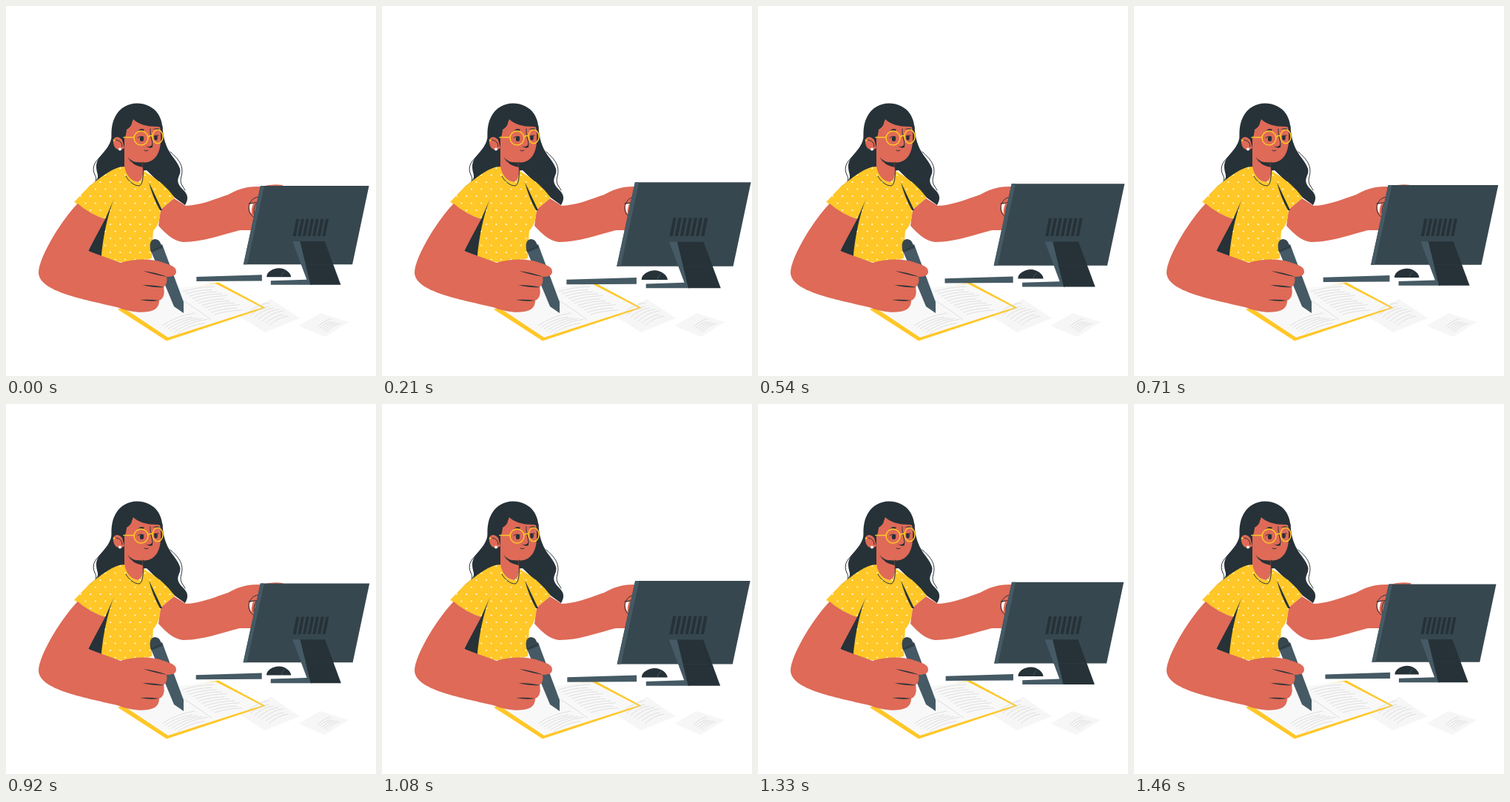
Recreate the animation shown at these times as an HTML page. Size 500 by 500 pixels, loop 1.5 s.

```html
<!DOCTYPE html>
<html lang="en">
<head>
<meta charset="utf-8">
<title>Desk work</title>
<style>
  html, body { margin: 0; width: 100%; height: 100%; overflow: hidden; background: #fff; }
  svg { display: block; width: 100%; height: 100%; }
  .skin { fill: #de6a57; }
  .dark { fill: #263238; }
  .steel { fill: #37474f; }
  .slate { fill: #455a64; }
  .yellow { fill: #ffc727; }
  .paper { fill: #f6f6f6; }
  .ink, .gold, .rule { fill: none; stroke-linecap: round; }
  .ink { stroke: #263238; stroke-width: 1; }
  .gold { stroke: #ffc727; stroke-width: 1.5; }
  .rule { stroke: #d8d8d8; stroke-width: .8; }
</style>
</head>
<body>
<svg viewBox="0 0 500 500">
  <defs>
    <pattern id="dots" width="13.4" height="19" patternUnits="userSpaceOnUse" patternTransform="translate(151.4 235)">
      <g fill="#fff"><circle cx="3" cy="3" r="1"/><circle cx="9.7" cy="12.5" r="1"/></g>
    </pattern>
    <path id="shirt" d="M160 217C146 217 130 230 112 244L92 265Q110 280 134 288L148 256C138 278 131 312 129 338Q152 348 170 347L197 341C198 328 198 314 199 304C206 296 208 288 209 275L228 259Q213 238 186 223Q184 239 176 238Q163 233 160 217Z"/>
  </defs>

  <!-- loose sheets and notebook -->
  <path class="paper" d="M313 418L358 396L397 422L350 441ZM395 432L425 415L463 427L431 447Z"/>
  <path class="yellow" d="M151 410L217 452.5L351 408L287 373.5L235 383Z"/>
  <path fill="#f8f8f8" d="M159 408L219 448L346 407.5L283 375L235 381L207 388Z"/>
  <path class="rule" d="M236 396Q262 412 277 424"/>
  <g id="rules"></g>

  <!-- hair behind -->
  <path class="dark" d="M143 170C144 195 122 200 122 217C122 230 131 231 112 244L160 225L190 222L228 259L242 269C247 260 246 255 239 248C225 234 238 230 235 220C231 205 213 199 211.500 162L175 140Z"/>
  <path class="ink" d="M142 187C132 204 112 210 120 228C125 237 118 241 111 246M222 197C236 209 240 218 237 230C234 240 239 243 242 249"/>

  <!-- far arm -->
  <path class="skin" d="M209 275L227 260L243 270C264 269 282 261 300 255C318 245 328 244 345 244Q360 240 374 242L374 303L316 303C292 309 266 319 240 319C225 318 214 305 206 297Z"/>
  <path d="M329 268L334 267Q331 275 332 281Q328 276 329 268Z" fill="#fff"/>
  <path class="ink" d="M341 258C325 260 324 283 337 286M328 267L342 265M338 267Q333 275 336 284"/>

  <!-- head -->
  <path class="skin" d="M160 190V222Q165 236 178 238Q185 236 186 222L184 206Z"/>
  <path class="dark" d="M164 204Q172 213 184 211L185 218Q171 216 164 204Z"/>
  <path class="skin" d="M160 160L172 149L205 158Q210 163 209 181C209 196 203 211 187 211.500C173 211.500 163 205 160 194Z"/>
  <path class="dark" d="M143 180C140 154 152 132 177 131.500C199 132 211 147 211.500 166Q209 163 204 163Q182 163 172 153C169 160 170 163 163 167C162 177 160 182 156 181L148 186Z"/>
  <path class="skin" d="M157 181C151 174 144 177 145 185Q146 194 155 195L160 192Z"/>
  <path class="ink" d="M149 181Q157 182 157 190M195 166C194 174 198 181 198 188M187 195Q190 197 192 195"/>
  <path class="dark" d="M189 189Q194 192 198 187V191Q193 193 189 189Z"/>
  <circle cx="154" cy="193.500" r="1.900" fill="#fff"/>
  <circle class="yellow" cx="146" cy="181.500" r="1.300"/>
  <path class="dark" d="M178 169Q182 164 187 167L185 169Q181 167 178 169ZM198 167Q203 164 207 166L207 167.500Q202 166 198 167Z"/>
  <g class="dark"><ellipse cx="183.500" cy="179.500" rx="2.700" ry="3.500"/><ellipse cx="202.500" cy="178" rx="2.300" ry="3.500"/></g>
  <path class="ink" d="M178 178Q181 175 186 177M200 176L206 175"/>
  <g class="gold">
    <circle cx="182.500" cy="178.500" r="9.500"/>
    <ellipse cx="205" cy="176.500" rx="7" ry="9.200"/>
    <path d="M159 177.500H173M192 177Q195 174 198 176"/>
  </g>

  <!-- torso -->
  <path class="dark" d="M148 256L111 331L131 340Z"/>
  <use href="#shirt" class="yellow"/>
  <use href="#shirt" fill="url(#dots)"/>
  <path class="dark" d="M193 238L211 276L208 276Q198 258 193 238Z"/>
  <path class="ink" d="M162 230C166 237 173 243 180 243Q187 241 185 211"/>

  <!-- pen and near arm -->
  <path class="slate" d="M195 329L211 322L240 400V415L227 406Z"/>
  <path class="steel" d="M195 329Q193 316 201 315Q207 315 209 321L212 327L197 333Z"/>
  <path class="ink" d="M196 331L211 325"/>
  <path class="skin" d="M97 267C79 284 44 338 44 361C46 386 103 396 150 407C165 413 181 415 192 413Q207 411 207 398C213 396 215 388 213 380Q219 375 217 366C225 366 230 364 230 359C230 352 222 350 213 347C199 341 173 341 155 347L111 331L134 288Q111 280 97 267Z"/>
  <path class="dark" d="M185 358Q202 360 218 366Q204 364 185 358ZM184 377Q200 377 214 380Q202 381 184 377ZM181 397Q194 396 207 398Q195 400 181 397Z"/>

  <!-- pulsing computer, keyboard and mouse -->
  <g id="computer">
    <path class="slate" d="M258.700 365.300L346.200 362.700V370.800L258.700 371.300ZM358 370.500L406 369L387 318H399L413 376H358Z"/>
    <path class="dark" d="M397 318H430L451.500 376H411Z"/>
    <path class="steel" d="M344.300 243.700H489.200L467 348.700H321.500Z"/>
    <path class="slate" d="M344.300 243.700H349.300L326.500 348.700H321.500Z"/>
    <path class="dark" d="M397 318H430L441.400 348.700H404.500Z"/>
    <path class="slate" d="M387 318H397L404.500 348.700H398.400Z"/>
    <g id="vents" class="dark"></g>
    <path class="dark" d="M352.500 365.500C352 359 361 353.700 369 353.700C377 353.700 385 360 385 365.500Z"/>
    <path d="M372 365Q373 360 377 358" fill="none" stroke="#455a64" stroke-width=".8"/>
  </g>
</svg>
<script>
const $ = id => document.getElementById(id);

// Rows of slightly wavy handwriting: start, vector along a line, step between lines.
function writing(count, x, y, dx, dy, stepX, stepY) {
  let d = "";
  for (let i = 0; i < count; i++) {
    const k = 1 - (i * 3 % 4) * .06;
    d += `M${x + i * stepX} ${y + i * stepY}q${dx * k * .45} ${dy * k * .75 - 1} ${dx * k} ${dy * k}`;
  }
  return `<path class="rule" d="${d}"/>`;
}
$("rules").innerHTML =
  writing(11, 239, 386, 42, -7, 4.3, 3.1) +
  writing(6, 211, 432, 44, -17, 4.2, 2.1) +
  writing(7, 326, 415, 29, -14, 5, 2.7) +
  writing(5, 421, 434, 18, -11, 3, 1.6);

let vents = "";
for (let i = 0; i < 7; i++) vents += `M${392 + i * 6.55} 288h4l-4.500 23h-4z`;
$("vents").innerHTML = `<path d="${vents}"/>`;

const LOOP = 1500, STEP = 1000 / 24, LEAD = 35;
const start = performance.now();

// Double beat: up, slow release, up, quick release.
function beat(p) {
  if (p < .2) return p / .2;
  if (p < .6) return (.6 - p) / .4;
  if (p < .8) return (p - .6) / .2;
  return (1 - p) / .2;
}

function draw(now) {
  const t = Math.floor(Math.max(0, now - start) % LOOP / STEP + .1) * STEP;
  const scale = 1 + .1 * beat((t + LEAD) % LOOP / LOOP);
  $("computer").setAttribute("transform", `translate(374 309.900) scale(${scale}) translate(-374 -309.900)`);
  requestAnimationFrame(draw);
}
draw(start);
</script>
</body>
</html>
```
